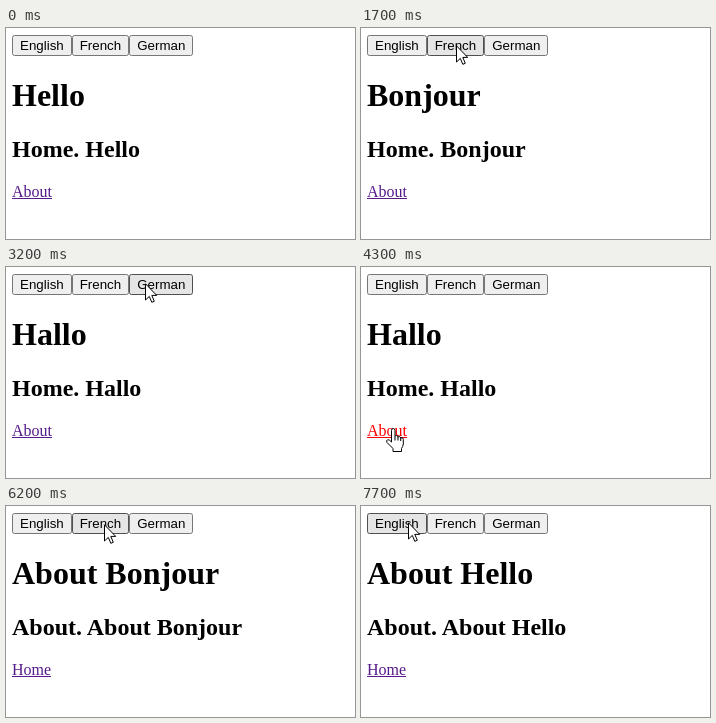
An HTML page for the animation above (8000 ms loop, 349 by 211 pixels).

```html
<!DOCTYPE html>
<html lang="en">
<head>
<meta charset="utf-8">
<title>Language switcher</title>
<style>
html, body { margin: 0; width: 100%; height: 100%; overflow: hidden; background: #fff; }
svg { display: block; width: 349px; height: 211px; }
text { font-family: "Liberation Serif", "Times New Roman", serif; font-size: 16px; white-space: pre; }
#title { font-size: 32px; font-weight: bold; }
#sub { font-size: 24px; font-weight: bold; }
.btn text { font: 13.333px "Liberation Sans", Arial, sans-serif; }
.btn rect { fill: #efefef; stroke: #767676; }
.btn.hover rect { fill: #e5e5e5; stroke: #4f4f4f; }
.btn.press rect { fill: #f5f5f5; stroke: #8d8d8d; }
#link { fill: #551a8b; }
#link.press { fill: #f00; }
.cursor path { fill: #fff; stroke: #000; stroke-linejoin: round; }
.cursor path.line { fill: none; }
</style>
</head>
<body>
<svg viewBox="0 0 349 211">
  <g id="buttons"></g>
  <text id="title" x="6" y="78"></text>
  <text id="sub" x="6" y="129"></text>
  <g id="link">
    <text id="label" x="6" y="169"></text>
    <rect id="rule" x="6" y="170" height="1"/>
  </g>
  <g class="cursor" id="arrow"><path d="M.5 .8V17L4.3 13.4L6.8 19.3L9.3 18.3L6.8 12.4H11.7Z"/></g>
  <g class="cursor" id="hand">
    <path d="M5.5 14V2.5Q5.5 .5 7.2 .5T9 2.5V8.5Q9 7.5 10.5 7.5T12 9.5Q12 8.5 13.3 8.5T14.7 10.5Q14.7 9.7 16 9.7T17.3 11.5V16Q17 18.5 15.5 20.5V23.5H7V20.5L1 14.5Q0 12.5 1.5 11.8T5.5 14Z"/>
    <path class="line" d="M9 8.5V12.5M12 9.5V12.5M14.7 10.5V13"/>
  </g>
  <g class="cursor" id="beam"><path class="line" d="M1 .5H3.5L4.5 1.5L5.5 .5H8M4.5 1.5V15.5M1 16.5H3.5L4.5 15.5L5.5 16.5H8"/></g>
</svg>
<script>
const LOOP = 8000;
const $ = id => document.getElementById(id);

// [label, left, right, text x]
const buttons = [
  ["English", 6, 66, 14],
  ["French", 66, 123, 73.7],
  ["German", 123, 187, 131.2]
].map(([label, left, right, x]) => {
  $("buttons").insertAdjacentHTML("beforeend",
    `<g class="btn"><rect x="${left + .5}" y="7.5" width="${right - left - 1}" height="20" rx="2"/>` +
    `<text x="${x}" y="22">${label}</text></g>`);
  return { el: $("buttons").lastElementChild, left, right };
});

// [time, shape, x, y]
const moves = [
  [0, ""],
  [700, "arrow", 27, -6],
  [800, "arrow", 72, 15],
  [900, "arrow", 97, 31],
  [1200, "arrow", 96, 26],
  [1300, "arrow", 95, 20],
  [1400, "arrow", 95, 17],
  [2400, "arrow", 101, 17],
  [2500, "arrow", 113, 17],
  [2600, "arrow", 127, 17],
  [2700, "arrow", 136, 16],
  [2800, "arrow", 139, 16],
  [3600, "arrow", 134, 26],
  [3700, "arrow", 112, 58],
  [3800, "beam", 78, 104],
  [3900, "arrow", 50, 139],
  [4000, "hand", 29, 158],
  [4100, "hand", 25, 161],
  [5000, "arrow", 92, 137],
  [5100, "beam", 160, 65],
  [5500, "beam", 104, 64],
  [5600, "beam", 10, 62],
  [5700, "arrow", 60, 36],
  [5800, "arrow", 95, 25],
  [5900, "arrow", 97, 21],
  [6000, "arrow", 98, 18],
  [6900, "arrow", 82, 19],
  [7100, "arrow", 70, 44],
  [7200, "beam", 52, 111],
  [7300, "arrow", 47, 32],
  [7400, "arrow", 47, 16]
];
const words = [[0, "Hello"], [1700, "Bonjour"], [3200, "Hallo"], [6200, "Bonjour"], [7700, "Hello"]];
const pages = [[0, "Home"], [4400, "About"]];
const presses = [[1600, 1700], [3000, 3200], [4300, 4400], [6100, 6200], [7600, 7700]];

const at = (list, t) => list.findLast(step => step[0] <= t);

function setText(id, value) {
  if ($(id).textContent !== value) $(id).textContent = value;
}

function draw(t) {
  const [, shape, x, y] = at(moves, t);
  const word = at(words, t)[1];
  const page = at(pages, t)[1];
  const down = presses.some(([from, to]) => t >= from && t < to);
  const home = page === "Home";
  const title = home ? word : "About " + word;

  setText("title", title);
  setText("sub", page + ". " + title);
  setText("label", home ? "About" : "Home");
  $("rule").setAttribute("width", home ? 40 : 39);
  $("link").setAttribute("class", down && shape === "hand" ? "press" : "");

  for (const b of buttons) {
    const over = shape === "arrow" && x >= b.left && x < b.right && y >= 7 && y < 28;
    b.el.setAttribute("class", "btn" + (over ? (down ? " press" : " hover") : ""));
  }
  for (const id of ["arrow", "hand", "beam"]) {
    $(id).style.display = id === shape ? "" : "none";
    if (id === shape) $(id).setAttribute("transform", `translate(${x} ${y})`);
  }
}

const start = performance.now();
function tick() {
  draw((performance.now() - start) % LOOP);
  requestAnimationFrame(tick);
}
tick();
</script>
</body>
</html>
```
